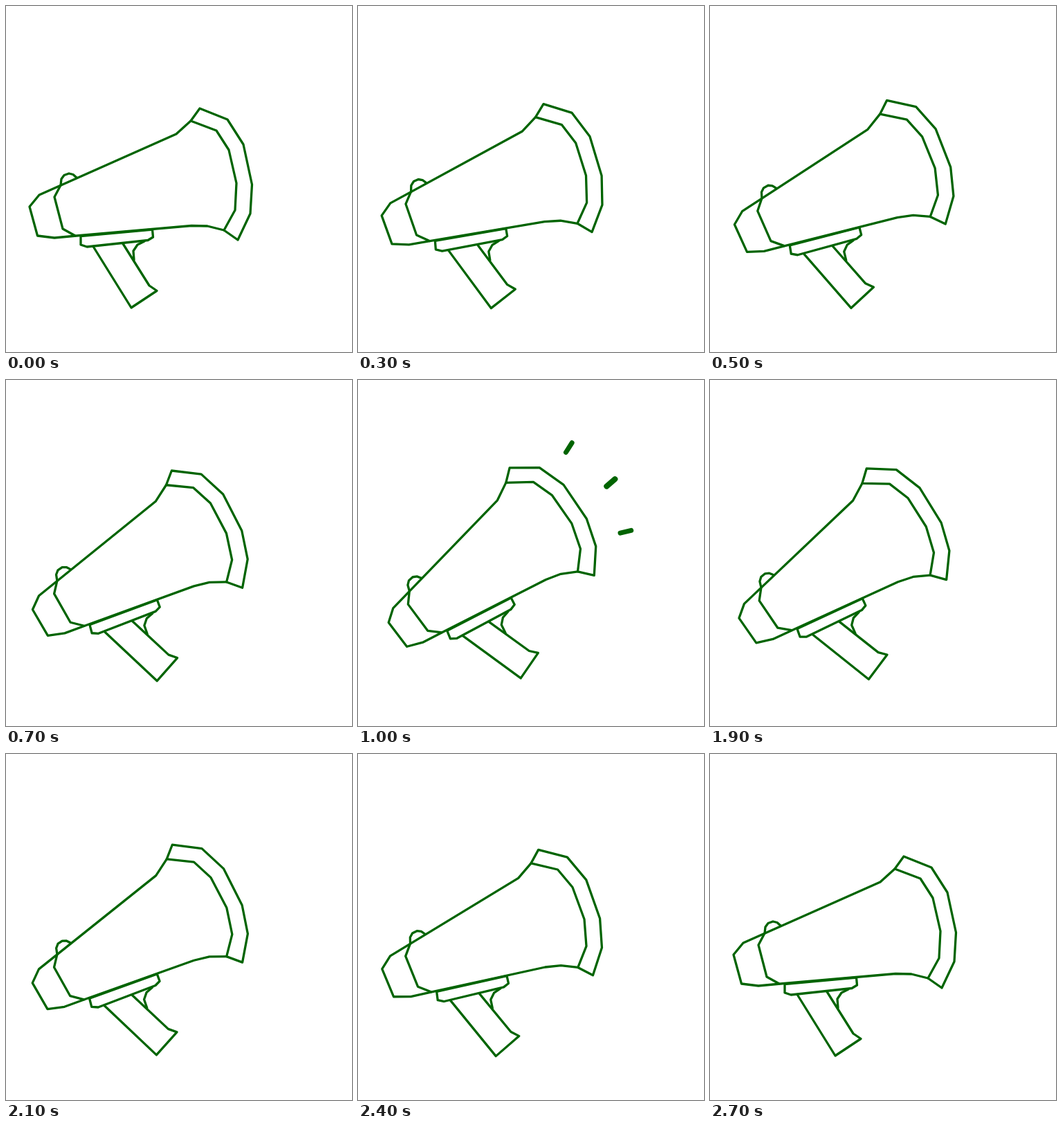
Animation of 500x500 px, one loop 3.1 s. Source, as an HTML page:

```html
<!DOCTYPE html>
<html lang="en">
<head>
<meta charset="utf-8">
<title>Megaphone</title>
<style>
  html, body { margin: 0; width: 100%; height: 100%; overflow: hidden; background: #fff; }
  svg { display: block; width: 100%; height: 100%; }
  path, line { fill: none; stroke: #006400; stroke-linecap: round; stroke-linejoin: round; }
  path { stroke-width: 3.3; }
</style>
</head>
<body>
<svg viewBox="0 0 500 500">
  <g id="horn">
    <!-- body -->
    <path d="M267 166 246 185 48 273 34 290 45.5 332 70 335 102 332 268 317.5 291 318 315 324"/>
    <!-- rim -->
    <path d="M267 166 280 148 320 164 343 200 355.5 258 353 300 335 338 315 324 331 295 333 256 322 208 304 180Z"/>
    <!-- mouthpiece and knob -->
    <path d="M102 248 97 243.5 91 242 84 244.5 80 250 79 259 70 276 82 322 100 332"/>
    <!-- plate -->
    <path d="M108 332.5V345L117 348 205 338.5 212.5 334 211.5 323Z"/>
    <!-- handle and trigger -->
    <path d="M126 347.5 181 436 218 411.5 207 404 169 343.5"/>
    <path d="M200 340 190 345 184 354 185 367"/>
  </g>
  <g id="rays"></g>
</svg>
<script>
const LOOP = 3100, STEP = 100, SPAN = 9;   // three stages of nine steps, then a rest
const TILT = 22, PIVOT = '195 294';
const RAY_SPEED = 0.178, TAIL_DELAY = 3.2;

const horn = document.getElementById('horn');
const rayGroup = document.getElementById('rays');

// start x, y, end x, y, width
const rays = [
  [300.5, 104.5, 349, 27.5, 7],
  [359.3, 153.6, 427.3, 94.8, 8],
  [379, 221.2, 467.5, 199.5, 7]
].map(([x1, y1, x2, y2, width]) => {
  const el = document.createElementNS('http://www.w3.org/2000/svg', 'line');
  el.setAttribute('stroke-width', width);
  rayGroup.appendChild(el);
  return { el, x1, y1, x2, y2 };
});

const clamp = v => Math.min(1, Math.max(0, v));
const mix = (a, b, u) => a + (b - a) * u;
const easeIn = u => u - 0.56 * u * (1 - u);

function tilt(n) {
  return n < SPAN ? easeIn(n / SPAN) : 1 - clamp((n - 2 * SPAN) / SPAN);
}

function draw(ms) {
  const n = Math.floor((ms % LOOP) / STEP);
  horn.setAttribute('transform', `rotate(${-TILT * tilt(n)} ${PIVOT})`);

  const age = n - SPAN;
  const head = clamp(age * RAY_SPEED);
  const tail = clamp((age - TAIL_DELAY) * RAY_SPEED);
  rayGroup.style.display = age > 0 && age < SPAN ? '' : 'none';
  for (const { el, x1, y1, x2, y2 } of rays) {
    el.setAttribute('x1', mix(x1, x2, tail));
    el.setAttribute('y1', mix(y1, y2, tail));
    el.setAttribute('x2', mix(x1, x2, head));
    el.setAttribute('y2', mix(y1, y2, head));
  }
}

const start = performance.now();
function tick() {
  draw(performance.now() - start);
  requestAnimationFrame(tick);
}
tick();
</script>
</body>
</html>
```
